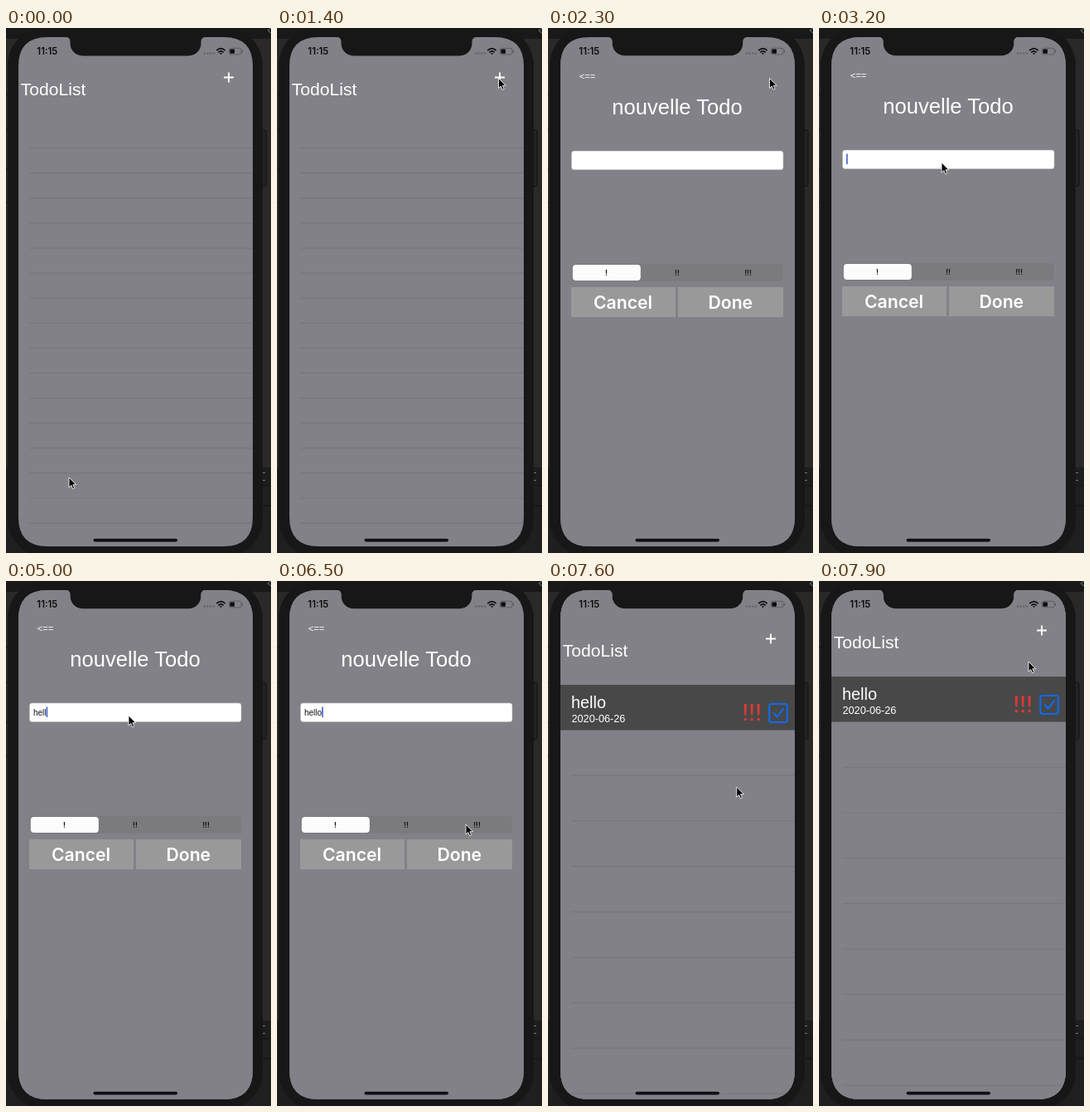
An HTML page that plays this animation: 320 by 632 pixels, repeating every 8 s.

```html
<!DOCTYPE html>
<html lang="fr">
<head>
<meta charset="utf-8">
<title>Todo</title>
<style>
  html, body { margin: 0; width: 100%; height: 100%; overflow: hidden; background: #1f1f1e; }
  svg { display: block; width: 320px; height: 632px; }
  text { font-family: "Liberation Sans", Arial, sans-serif; fill: #fff; }
  .ui { font-family: Inter, "Liberation Sans", sans-serif; font-weight: 600; text-anchor: middle; }
  .seg { font-size: 9px; fill: #111; }
  .btn { font-size: 21.2px; }
</style>
</head>
<body>
<svg viewBox="0 0 320 632">
  <defs>
    <clipPath id="screen">
      <path d="M50 11H72.500A5 5 0 0 1 77.500 16V18.500A15 15 0 0 0 92.500 33.500H220.500A15 15 0 0 0 235.500 18.500V16A5 5 0 0 1 240.500 11H263Q298 11 298 46V589Q298 624 263 624H50Q15 624 15 589V46Q15 11 50 11Z"/>
    </clipPath>
    <g id="header">
      <text x="17.800" y="81.400" font-size="21.100">TodoList</text>
      <path d="M263 59.500H275M269 53.500V65.500" stroke="#fff" stroke-width="1.900"/>
    </g>
    <path id="bang" d="M-1.700 .6Q0 -.4 1.700 .6L1 13.500H-1ZM-1.800 18.600a1.800 1.800 0 1 0 3.600 0a1.800 1.800 0 1 0 -3.600 0Z"/>
  </defs>

  <!-- desktop behind the phone -->
  <rect width="320" height="632" fill="#2a2927"/>
  <rect width="320" height="13" fill="#19191a"/>
  <rect y="529" width="320" height="21" fill="#1d1d1e"/>
  <rect y="550" width="320" height="82" fill="#1f1f1f"/>
  <path d="M0 575H320M0 551H320M0 80H3M0 122H3M0 170H3M0 210H3" stroke="#111"/>
  <rect x="300" y="122.500" width="14" height="68" rx="2" fill="#242322" stroke="#111"/>
  <path d="M320 0L316 3L320 6" fill="none" stroke="#77777a"/>
  <path d="M313 535.500H309.500V539M309.500 541V544.500H313" fill="none" stroke="#77777a"/>
  <rect x="2" y="-1" width="308" height="638" rx="46" fill="#171718"/>

  <g clip-path="url(#screen)">
    <rect width="320" height="632" fill="#828187"/>
    <g id="empty"><use href="#header"/></g>
    <g id="form">
      <rect y="11" width="320" height="640" fill="#828187"/>
      <text x="37.800" y="61" font-size="11.200">&lt;==</text>
      <text x="156" y="102.500" font-size="25.600" text-anchor="middle">nouvelle Todo</text>
      <rect x="28.500" y="147" width="255.500" height="22.500" rx="3" fill="#fff" stroke="#c4c3c6" stroke-width=".6"/>
      <text id="typed" x="33" y="161.800" font-size="10" style="fill:#111"></text>
      <rect id="caret" y="151.500" width="1.600" height="12.500" fill="#3d5fd6"/>
      <rect x="28" y="283" width="256" height="21" rx="4.500" fill="#7b7a7e"/>
      <rect id="pill" x="29.800" y="284" width="82" height="19" rx="4" fill="#fdfcfd"/>
      <text class="ui seg" x="70.500" y="296.800">!</text>
      <text class="ui seg" x="156" y="296.800">!!</text>
      <text class="ui seg" x="241.500" y="296.800">!!!</text>
      <path d="M28 311H154V347H28ZM157 311H284V347H157Z" fill="#9a999a"/>
      <text class="ui btn" x="90.500" y="337">Cancel</text>
      <text class="ui btn" x="220.300" y="337">Done</text>
    </g>
    <g id="filled">
      <rect y="11" width="320" height="640" fill="#828187"/>
      <use href="#header"/>
      <rect x="14" y="115" width="284" height="54.500" fill="#494849"/>
      <text x="28" y="142.500" font-size="19.900">hello</text>
      <text x="28.500" y="160.300" font-size="12.700">2020-06-26</text>
      <g fill="#dc3a33">
        <use href="#bang" x="238.300" y="138"/>
        <use href="#bang" x="246.200" y="138"/>
        <use href="#bang" x="254.100" y="138"/>
      </g>
      <g fill="none" stroke="#0d6bee" stroke-width="2.100" stroke-linejoin="round" stroke-linecap="round">
        <rect x="267.300" y="138" width="21.500" height="22" rx="2.500"/>
        <path d="M273 149.200L276.600 153.700L284 144.200"/>
      </g>
    </g>

    <!-- status bar and home indicator -->
    <text class="ui" x="49.800" y="32" font-size="11.300" style="fill:#0c0c0e">11:15</text>
    <path d="M239 30.500H252" stroke="#5f5e63" stroke-width="1.800" stroke-dasharray="2 1.600"/>
    <g fill="none" stroke="#0c0c0e" stroke-width="1.700">
      <path d="M254.300 27.200Q259.500 22.200 264.700 27.200M256.300 29.500Q259.500 26.400 262.700 29.500"/>
      <path d="M258 30.600Q259.500 29.400 261 30.600L259.500 32.200Z" fill="#0c0c0e" stroke="none"/>
    </g>
    <rect x="269.300" y="24.300" width="14.800" height="7.600" rx="2.200" fill="none" stroke="#55545a" stroke-width=".8"/>
    <path d="M285.500 26.700V29.600" stroke="#55545a"/>
    <rect x="270.400" y="25.400" width="5.600" height="5.400" rx="1" fill="#0c0c0e"/>
    <rect x="105.500" y="614.800" width="101.500" height="3.600" rx="1.800" fill="#0f0f11"/>
  </g>

  <path id="pointer" d="M0 0V12L2.800 9.500L4.700 13.800L6.700 12.900L4.900 8.700H8.700Z" fill="#050505" stroke="#f4f4f4" stroke-width=".9" stroke-linejoin="round"/>
</svg>
<script>
const LOOP = 8000, STEP = 100, HEIGHT = 613;
const $ = id => document.getElementById(id);

// each pointer trip: start time, end time, x, y
const trips = [
  [100, 400, 234, 83],
  [500, 900, 267, 62],
  [1100, 1400, 267.5, 60.5],
  [2300, 2700, 152, 145],
  [2700, 2800, 156, 172],
  [2800, 3000, 148, 162],
  [5800, 6300, 226, 299],
  [6300, 6500, 228, 293],
  [6700, 7000, 214, 330],
  [7400, 7900, 253, 97]
];

function ease(t, a, b) {
  const p = Math.min(1, Math.max(0, (t - a) / (b - a)));
  return p * p * (3 - 2 * p);
}

function pointerAt(t) {
  let x = 76, y = 541;
  for (const [a, b, toX, toY] of trips) {
    const p = ease(t, a, b);
    x += (toX - x) * p;
    y += (toY - y) * p;
  }
  return [x, y];
}

// critically damped slide from below the screen
function slide(t, start) {
  const x = 18.26 * Math.max(0, t - start) / 1000;
  return (HEIGHT + 10 * (t < start)) * (1 + x) * Math.exp(-x);
}

// one letter, a pause, then an even typing rhythm
function lettersAt(t) {
  return (t >= 4400) + Math.min(4, Math.max(0, Math.floor((t - 4550) / 150)));
}

// the blink starts over after typing
function caretAt(t) {
  const age = t - (t < 4400 ? 3100 : 5000);
  if (t < 3100) return 0;
  return 1 - ease(age, 500, 800) + ease(age, 1000, 1300) - ease(age, 1500, 1800);
}

function move(id, x, y) {
  $(id).setAttribute("transform", `translate(${x.toFixed(2)} ${y.toFixed(2)})`);
}

function addRules(id, first, gap) {
  let d = "";
  for (let y = first; y < 620; y += gap) d += `M28 ${y.toFixed(1)}H298`;
  const rule = document.createElementNS("http://www.w3.org/2000/svg", "path");
  rule.setAttribute("d", d);
  rule.setAttribute("stroke", "#747378");
  rule.setAttribute("stroke-width", ".9");
  $(id).append(rule);
}

function draw(t) {
  move("form", 0, slide(t, 1831));
  move("filled", 0, slide(t, 7267.5));
  move("pill", 170.6 * ease(t, 6500, 6900), 0);
  move("pointer", ...pointerAt(t));
  const typed = $("typed");
  typed.textContent = "hello".slice(0, lettersAt(t));
  $("caret").setAttribute("x", 33 + typed.getComputedTextLength());
  $("caret").setAttribute("opacity", caretAt(t));
}

addRules("empty", 144.6, 30.1);
addRules("filled", 224.2, 54.7);

let begin;
function tick(now) {
  begin ??= now;
  const t = (now - begin) % LOOP;
  draw(Math.floor(t / STEP) * STEP);
  requestAnimationFrame(tick);
}
draw(0);
requestAnimationFrame(tick);
</script>
</body>
</html>
```
